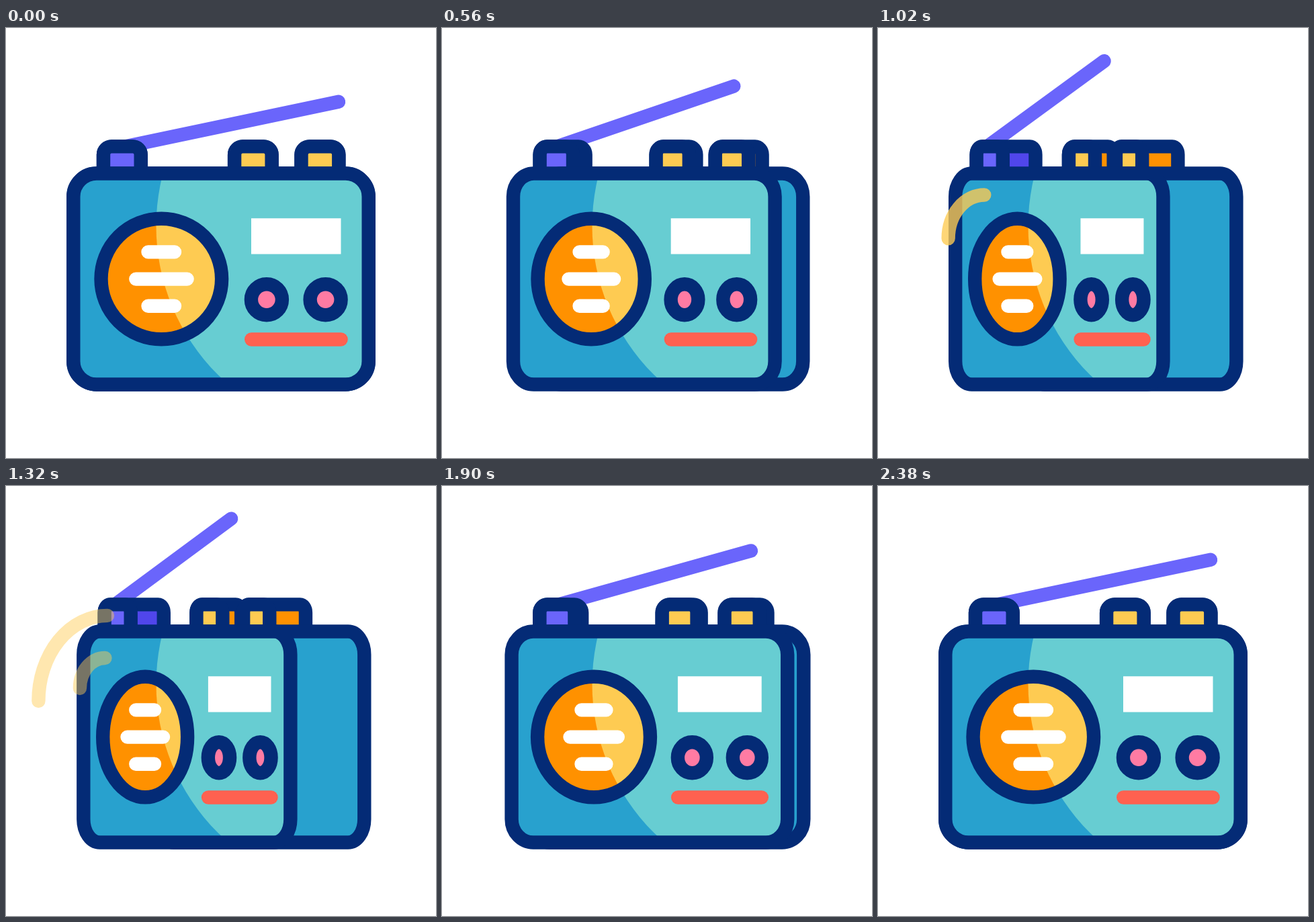
An HTML page with a canvas that plays this animation: 640 px wide and 640 px high, repeating every 2.4 s.

```html
<!DOCTYPE html>
<html lang="en">
<head>
<meta charset="utf-8">
<title>Radio</title>
<style>
  html, body { margin: 0; width: 100%; height: 100%; overflow: hidden; background: #fff; }
  canvas { display: block; width: 100%; height: 100%; }
</style>
</head>
<body>
<canvas id="stage" width="640" height="640"></canvas>
<script>
const ctx = document.getElementById('stage').getContext('2d');
const LOOP = 2400, TURN = 1200, BACK = 1180;
const LINE = 20.4, PIVOT = 150.5;
const C = {
  navy: '#042b76', blue: '#28a1ce', teal: '#67cdd2', orange: '#ff9100', yellow: '#fecb52',
  pink: '#ff7ba3', red: '#ff6150', violet: '#6a65fb', indigo: '#5046eb', white: '#fff'
};

// left, right, travel of the rear edge, front colour, side colour
const BUTTONS = [
  [145, 200.7, 34.3, C.violet, C.indigo],
  [340.1, 395.6, -45.7, C.yellow, C.orange],
  [439.5, 495.3, -49.7, C.yellow, C.orange]
];

// time, then the upper end and the lower end of the arc
const WAVES = [
  { start: 650, rise: 285, keys: [
    [640, 167, 280, 140, 312], [760, 164, 273, 134, 310], [1080, 157, 243, 98, 314],
    [1320, 151, 193, 48.5, 320], [1680, 140, 158, 6, 325]] },
  { start: 1040, rise: 250, keys: [
    [1040, 153, 266, 124, 305], [1320, 147.5, 256, 110, 301], [1680, 129, 231, 77, 294]] }
];

const clamp = v => Math.min(1, Math.max(0, v));

// cubic-bezier(.75, 0, .25, 1)
function ease(x) {
  let lo = 0, hi = 1, u = 0.5;
  for (let i = 0; i < 30; i++) {
    u = (lo + hi) / 2;
    const bx = 2.25 * u * (1 - u) ** 2 + 0.75 * u * u * (1 - u) + u ** 3;
    if (bx < x) lo = u; else hi = u;
  }
  return u * u * (3 - 2 * u);
}

const turnAt = t => t < TURN ? ease(t / TURN) : 1 - ease(clamp((t - TURN) / BACK));

function keyed(keys, t) {
  let i = 0;
  while (i < keys.length - 2 && t > keys[i + 1][0]) i++;
  const a = keys[i], b = keys[i + 1];
  const u = Math.max(0, (t - a[0]) / (b[0] - a[0]));
  return a.slice(1).map((v, k) => v + (b[k + 1] - v) * u);
}

function fill(color) { ctx.fillStyle = color; ctx.fill(); }

function stroke(color) {
  ctx.strokeStyle = color;
  ctx.lineWidth = LINE;
  ctx.stroke();
}

// Builds a path squeezed around the pivot; strokes keep their full width.
function squeezed(scale, shift, build) {
  ctx.save();
  ctx.translate(PIVOT * (1 - scale) + shift, 0);
  ctx.scale(scale, 1);
  ctx.beginPath();
  build();
  ctx.restore();
}

function segment(x1, y1, x2, y2) { ctx.moveTo(x1, y1); ctx.lineTo(x2, y2); }

const panel = () => ctx.roundRect(100.3, 216.5, 439.4, 314, 34.5);

// Fills the current path in two tones split by one large fixed circle.
function twoTone(dark, light) {
  fill(dark);
  ctx.save();
  ctx.clip();
  ctx.beginPath();
  ctx.arc(535.5, 295, 312, 0, 7);
  fill(light);
  ctx.restore();
}

function antenna(p) {
  ctx.beginPath();
  segment(177.3 - 15 * p, 176.4, 495 - 161 * p, 109.8 - 61.6 * p);
  stroke(C.violet);
}

function cap(left, right, rx, color) {
  const top = 176.4, ry = 12, base = 217;
  ctx.beginPath();
  ctx.moveTo(left, base);
  ctx.lineTo(left, top + ry);
  ctx.ellipse(left + rx, top + ry, rx, ry, 0, Math.PI, Math.PI * 1.5);
  ctx.lineTo(right - rx, top);
  ctx.ellipse(right - rx, top + ry, rx, ry, 0, -Math.PI / 2, 0);
  ctx.lineTo(right, base);
  fill(color);
  stroke(C.navy);
}

function buttons(p, s) {
  const place = x => PIVOT + (x - PIVOT) * s;
  for (const [left, right, travel, front, side] of BUTTONS) {
    cap(place(left), right + travel * p, 12 * s, side);
    cap(place(left), place(right), 12 * s, front);
  }
}

function body(p, s) {
  squeezed(s, 110.7 * p, panel);
  fill(C.blue);
  stroke(C.navy);
  squeezed(s, 0, panel);
  twoTone(C.blue, C.teal);
  squeezed(s, 0, panel);
  stroke(C.navy);
}

function speaker(s) {
  const ring = () => ctx.arc(231.3, 373.5, 89.8, 0, 7);
  squeezed(s, 0, ring);
  twoTone(C.orange, C.yellow);
  squeezed(s, 0, ring);
  stroke(C.navy);
  squeezed(s, 0, () => {
    segment(211.5, 333.4, 251, 333.4);
    segment(193.3, 373.6, 269.6, 373.6);
    segment(211.5, 413.8, 251, 413.8);
  });
  stroke(C.white);
}

function controls(s) {
  squeezed(s, 0, () => ctx.rect(365, 283.3, 133.5, 53.3));
  fill(C.white);
  for (const x of [387.9, 475.6]) {
    squeezed(s, 0, () => ctx.arc(x, 404.2, 23, 0, 7));
    fill(C.pink);
    stroke(C.navy);
  }
  squeezed(s, 0, () => segment(365.2, 463.5, 498.6, 463.5));
  stroke(C.red);
}

function waves(t) {
  const fade = (1745 - t) / 925;
  for (const { start, rise, keys } of WAVES) {
    const alpha = clamp(Math.min((t - start) / rise, fade));
    if (!alpha) continue;
    const [x1, y1, x2, y2] = keyed(keys, t);
    ctx.globalAlpha = alpha;
    ctx.beginPath();
    ctx.ellipse(x1, y2, x1 - x2, y2 - y1, 0, Math.PI, Math.PI * 1.5);
    stroke(C.yellow);
  }
  ctx.globalAlpha = 1;
}

function draw(t) {
  const p = turnAt(t), s = 1 - 0.301 * p;
  ctx.fillStyle = C.white;
  ctx.fillRect(0, 0, 640, 640);
  ctx.lineCap = 'round';
  ctx.lineJoin = 'round';
  antenna(p);
  buttons(p, s);
  body(p, s);
  speaker(s);
  controls(s);
  waves(t);
}

const began = performance.now();
function tick() {
  draw((performance.now() - began) % LOOP);
  requestAnimationFrame(tick);
}
tick();
</script>
</body>
</html>
```
